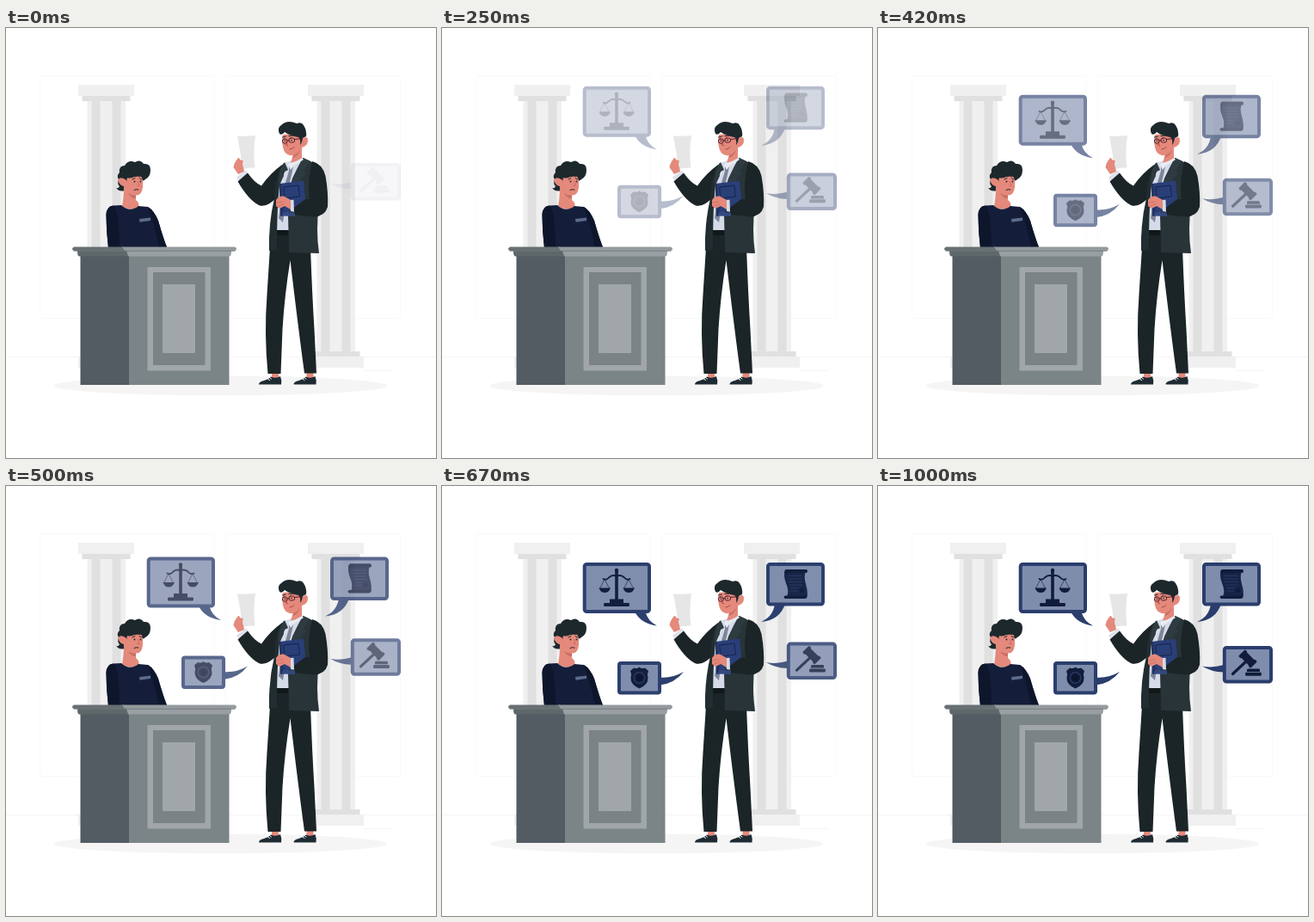
Recreate the animation shown at these times as an HTML page. Size 500 by 500 pixels, loop 1.04 s.

```html
<!DOCTYPE html>
<html lang="en">
<head>
<meta charset="utf-8">
<title>Courtroom</title>
<style>
html, body { margin: 0; width: 100%; height: 100%; overflow: hidden; background: #fff; }
svg { display: block; width: 100vw; height: 100vh; }
.line { fill: none; stroke-linecap: round; stroke-linejoin: round; }
.skin { fill: #e4897b; }
.frame { fill: #7f8dad; stroke: #2a3d6d; stroke-width: 4; }
.tail { fill: #2a3d6d; }
.ink { fill: #111c3a; }
.inkline { fill: none; stroke: #111c3a; }
</style>
</head>
<body>
<svg viewBox="0 0 500 500">
  <defs>
    <g id="column">
      <path fill="#f0f0f0" d="M84 66h65v13h-65zM94.500 85h44.500v291h-44.500zM84 382h65v13h-65z"/>
      <path fill="#e0e0e0" d="M88.500 79h56v6h-56zM99.500 85h10v291h-10zM123.500 85h10v291h-10zM88.500 376h56v6h-56z"/>
    </g>
    <g id="shoe">
      <path class="skin" d="M309 400h8v7h-8z"/>
      <path fill="#1f2b33" d="M294 414.500Q294 411 300 410Q305 409 308 405.500Q313 408 319 405Q321 410 320 414.500Z"/>
      <path class="line" stroke="#fff" stroke-width="1" d="M304.500 408l2 1.500M306.500 406.500l2 1.500"/>
    </g>
    <g id="pan">
      <path class="inkline" stroke-width=".6" d="M189 108.500l-5.500 10.500M189 108.500l5.500 10.500"/>
      <path class="ink" d="M182.500 118.500h13.500Q194 124 189.200 124T182.500 118.500Z"/>
    </g>
  </defs>

  <!-- room -->
  <g class="line" stroke="#f9f9f9">
    <rect x="39.500" y="55.500" width="203" height="282" rx="3"/>
    <rect x="255.500" y="55.500" width="203" height="282" rx="3"/>
    <path stroke="#f5f5f5" d="M0 382.500H500M416 398.500H449"/>
  </g>
  <ellipse cx="249.500" cy="416" rx="194" ry="11.300" fill="#f5f5f5"/>
  <use href="#column"/>
  <use href="#column" x="267"/>

  <!-- speech bubbles -->
  <g class="drop">
    <path class="tail" d="M224 146Q231 160 250 162.500Q239 157 236.500 146Z"/>
    <rect class="frame" x="165.700" y="91" width="75.300" height="55" rx="2.500"/>
    <use href="#pan"/>
    <use href="#pan" x="28"/>
    <path class="inkline" stroke-width="1.800" stroke-linecap="round" d="M187.500 108Q191 110 194 106.500Q198 102.500 203 105Q208 102.500 212 106.500Q215 110 218.500 108"/>
    <path class="ink" d="M201.200 98h3.600v34h-3.600zM195 131.500h16v4.500h-16zM189 136h28q1 0 1 2t-1 2h-28q-1 0-1-2t1-2z"/>
    <circle class="ink" cx="203" cy="98" r="2.200"/>
  </g>
  <g class="drop">
    <path class="tail" d="M253 222.500Q267 224 281 216Q270 230 253 231.500Z"/>
    <rect class="frame" x="206" y="206" width="47" height="34.500" rx="2"/>
    <path class="ink" d="M229.500 210.500Q232 213 236 211.500L240 215Q238 219 239.500 223Q240 231 229.500 235.500Q219 231 219.500 223Q221 219 219 215L223 211.500Q227 213 229.500 210.500Z"/>
    <circle cx="229.500" cy="223" r="6.300" fill="none" stroke="#2a3b63" stroke-width="1.200"/>
    <circle cx="229.500" cy="223" r="3.800" fill="#0b142c"/>
  </g>
  <g class="drop">
    <path class="tail" d="M387 137Q385 152 371 158Q393 156 399 137Z"/>
    <rect class="frame" x="379" y="91" width="64" height="46.500" rx="2.500"/>
    <path fill="#172448" d="M400 97H424Q420 104 423 114Q426 124 424 129H401Q404 122 400 113Q396 103 400 97Z"/>
    <path class="ink" d="M400 97h24q2 2 0 4h-22q-3 4-4-0.500q0-3 2-3.500zM399 127.500h22q2 0 3-3q2 6-2 6.500h-23q-3-1.800 0-3.500z"/>
    <path class="line" stroke="#34456f" stroke-width=".6" d="M403 104.500h15M402.500 108h16M403.500 111.500h15M404.500 115h14M405.500 118.500h9M406 122h7"/>
    <circle class="ink" cx="418.500" cy="121.500" r="2.600"/>
  </g>
  <g id="gavel">
    <path class="tail" d="M402 208Q389 212 377 209.500Q387 216 402 216.500Z"/>
    <rect class="frame" x="402.800" y="188" width="54.200" height="39.500" rx="2.500"/>
    <path class="inkline" stroke-width="3.200" stroke-linecap="round" d="M412.500 218.500L428 204"/>
    <g class="ink" transform="translate(430 201) rotate(45)">
      <rect x="-7" y="-4.500" width="14" height="9"/>
      <rect x="-10" y="-5.500" width="4" height="11" rx="1.200"/>
      <rect x="6" y="-5.500" width="4" height="11" rx="1.200"/>
    </g>
    <path class="ink" d="M430 212.500h13q1 0 1 1.500v2h-15v-2q0-1.500 1-1.500zM428 216.800h17q1 0 1 2t-1 2h-17q-1 0-1-2t1-2z"/>
  </g>

  <!-- witness -->
  <path fill="#1d282d" d="M131 176Q128 172 132 168Q131 160 138 160Q142 153 150 156Q156 152 160 158Q168 157 168 165Q168 173 162 176Q159 180 154 173L141 177L138 189Q132 191 128 186Q131 187 132 184Q129 181 131 176Z"/>
  <path class="skin" d="M137 185L140 172Q150 175 156 171Q160 175 159 185Q158 195 151 194.500L151 200Q156 204 154 208Q146 214 135 207Q137 198 137 185Z"/>
  <path fill="#cb6f66" d="M142 192Q146 195 151 194.500V198Q145 198 142 192Z"/>
  <path fill="#1d282d" d="M138 164H160V171Q155 175 151 171Q146 176 141 174L140 179Q136 176 138 164Z"/>
  <path class="skin" d="M140 177Q134 172 130.500 176Q130 183 140 185Z"/>
  <path class="line" stroke="#1d282d" stroke-width="1" d="M147 176l3-1.500M155 174.500l2.500 1.500M149 188.500Q151.500 187 154 188"/>
  <path class="line" stroke="#c4625a" stroke-width=".8" d="M153.500 178.500l1.500 5h-2"/>
  <circle cx="149.500" cy="178.500" r=".9" fill="#1d282d"/>
  <circle cx="156.500" cy="178.500" r=".9" fill="#1d282d"/>
  <path fill="#141e3a" d="M134 206Q144 215 154 207L165 208Q172 212 177 224Q183 245 187.500 256H119Q116.500 236 116.500 217Q117 207 125 206.500Z"/>
  <path fill="#0e162c" d="M116.500 217Q117 207 125 206.500Q132 212 132 256H119Q116.500 236 116.500 217ZM165 208Q172 212 177 224Q183 245 187.500 256H178Q174 233 165 208Z"/>
  <path fill="#5d6b8c" d="M155 222l13-1.500v3.500l-12.500 1.700z"/>

  <!-- stand -->
  <path fill="#535b63" d="M86.500 264h56.500v151H86.500z"/>
  <path fill="#7b8486" d="M143 264h116.500v151H143z"/>
  <path fill="#687073" d="M79 254.500H137L141 259H79Q77 258.500 77 257T79 254.500Z"/>
  <path fill="#949a9d" d="M135 254.500H266Q268 255 268 257T266 259H138Z"/>
  <path fill="#5e676a" d="M83 259H141L143 265.500H85Q83 265 83 259Z"/>
  <path fill="#999fa2" d="M140 259H262Q262 265.500 260 265.500H142Z"/>
  <path class="line" stroke="#6f777a" stroke-width=".8" d="M79 259.300H266"/>
  <path fill="#a0a6a9" d="M164.500 278h73.500v120.500h-73.500z"/>
  <path fill="#7b8386" d="M171 284h60.500v108H171z"/>
  <path fill="#a0a6a9" d="M182 298h38v80h-38z"/>

  <!-- lawyer -->
  <use href="#shoe"/>
  <use href="#shoe" x="40.500"/>
  <path fill="#1b2426" d="M313 236H331L354 255Q356 310 358.500 350L361 401.500H347Q340 350 330.500 270Q324 310 321.500 350L319.500 402H304.500Q300 355 303.500 310L307 255Z"/>
  <path fill="#e6e6e6" d="M269 125.500Q280 126 290 125Q287 144 289.500 162.500Q281 162 275 164Q273 145 269 125.500Z"/>
  <path class="skin" d="M270 170L264.500 162Q265 157 270 151Q272 151 272 153L276 154.500Q274 158 276 162L277 167Z"/>
  <path fill="#dce1ec" d="M268 173.500L279 165.500L281.500 169.500L270.500 178Z"/>
  <path fill="#1b2426" d="M269.500 178.500L281 168.500Q289 180 297 183.500Q307 169 321 159L332 166L317 195Q303 210 294 206Q282 200 269.500 178.500Z"/>
  <path fill="#d5dbe8" d="M322 157L346 151L338 200L328 236H314L317 185Z"/>
  <path fill="#7d8599" d="M329 160L334 160L333 166L328 188L322 226L317 221L322 190L329 166Z"/>
  <path fill="#11181a" d="M314 235h15v6h-15z"/>
  <path fill="#222d31" d="M323 157L326 162L318 183Q315 207 315 258L306 259Q305 228 312 198Q313 168 323 157Z"/>
  <path fill="#283438" d="M345 151Q363 157 368 168L364 205Q360 235 364 262L329 261L328 217Q328 190 333 175Z"/>
  <path fill="#2e3b40" d="M346 151L353 155L346 166L349 169L329 192Q333 170 346 151ZM324 156L328 165L322 168L323 172L317 184Q316 166 324 156Z"/>
  <path fill="#1b2426" d="M356 155Q368 158 371.500 172Q375 192 374 208Q371 219 358 219.500L334 217V200L353 199Q350 180 356 155Z"/>
  <path fill="#2a3f78" d="M318 181L346 177.500L348 199L324 217L319 219Z"/>
  <path fill="#223362" d="M318 181L320 180.800L323 218L319 219Z"/>
  <path class="line" stroke="#17254c" stroke-width="1" d="M323 185l17-2 1.500 13-17 2z"/>
  <path fill="#324981" d="M322 214l14 .5v4.500l-15-.5z"/>
  <path fill="#d5dbe8" d="M330.500 200l4-.2.500 14-4-.8z"/>
  <path class="skin" d="M331 200L323 195.500Q317 195 314 200V207L318 210L324 207L331 211Z"/>
  <path class="line" stroke="#c9675f" stroke-width=".7" d="M315 203l7-1M316 207l7-2"/>
  <path class="skin" d="M322 124L343 122L346 128Q351 125 351 131T344 139L344 152Q337 159 331 156L334 148Q326 149 323 142Q320 133 322 124Z"/>
  <path fill="#cb6f66" d="M334 148Q339 146 342 142Q340 149 333 151Z"/>
  <path fill="#e8ebf2" d="M330 157Q337 156 344 151L346 153L334 161L331 165L328 159Z"/>
  <path fill="#1d282d" d="M318 123Q315 116 320 113Q327 106 338 111Q344 109 346 113Q350 119 349 126L345 128Q344 134 342 136Q343 129 340 127Q330 125 324 121Q321 125 318 123Z"/>
  <g class="line" stroke="#51202c" stroke-width="1">
    <rect x="321.500" y="129" width="5.500" height="5" rx="2"/>
    <rect x="329" y="128" width="6.500" height="5" rx="2"/>
    <path d="M327 131l2-.5M335.500 129.500l9-1"/>
  </g>
  <path class="line" stroke="#1d282d" stroke-width="1" d="M321.500 127l4-1M329 125.500l5-.5"/>
  <circle cx="324.500" cy="131.300" r=".8" fill="#1d282d"/>
  <circle cx="332" cy="130.500" r=".8" fill="#1d282d"/>
  <path class="line" stroke="#a83f43" stroke-width=".9" d="M327 133l-1.500 3 2 .5M330 141Q333 141 335 138.500"/>
</svg>
<script>
const LOOP = 1040, STEP = 1000 / 24, LAST = 24;

// Values at every fourth step; shifts are relative to the drawn position.
const drop = { shift: [-35, -26, -16.5, -6.5, 0, 1.6, 0], alpha: [0, .18, .49, .78, .99, 1, 1] };
const gavel = { shift: [-29, -21, -14.2, -8.7, -4.4, -1.5, 0], alpha: [.06, .33, .5, .67, .84, 1, 1] };

const groups = [
  ...[...document.querySelectorAll(".drop")].map(el => [el, drop]),
  [document.getElementById("gavel"), gavel]
];

function linear(list, pos) {
  const i = Math.min(Math.floor(pos), list.length - 2);
  return list[i] + (list[i + 1] - list[i]) * (pos - i);
}

// Catmull-Rom curve through the listed values
function smooth(list, pos) {
  const n = list.length, i = Math.min(Math.floor(pos), n - 2), u = pos - i;
  const b = list[i], c = list[i + 1];
  const a = i > 0 ? list[i - 1] : 2 * b - c;
  const d = i + 2 < n ? list[i + 2] : 2 * c - b;
  return b + u / 2 * (c - a + u * (2 * a - 5 * b + 4 * c - d + u * (3 * (b - c) + d - a)));
}

function draw(time) {
  const step = Math.min(LAST, Math.floor((time + 4) / STEP));
  const pos = step / 4;
  for (const [el, track] of groups) {
    el.setAttribute("transform", `translate(0 ${smooth(track.shift, pos).toFixed(2)})`);
    el.setAttribute("opacity", linear(track.alpha, pos).toFixed(3));
  }
}

const start = performance.now();
function tick() {
  draw((performance.now() - start) % LOOP);
  requestAnimationFrame(tick);
}
tick();
</script>
</body>
</html>
```
